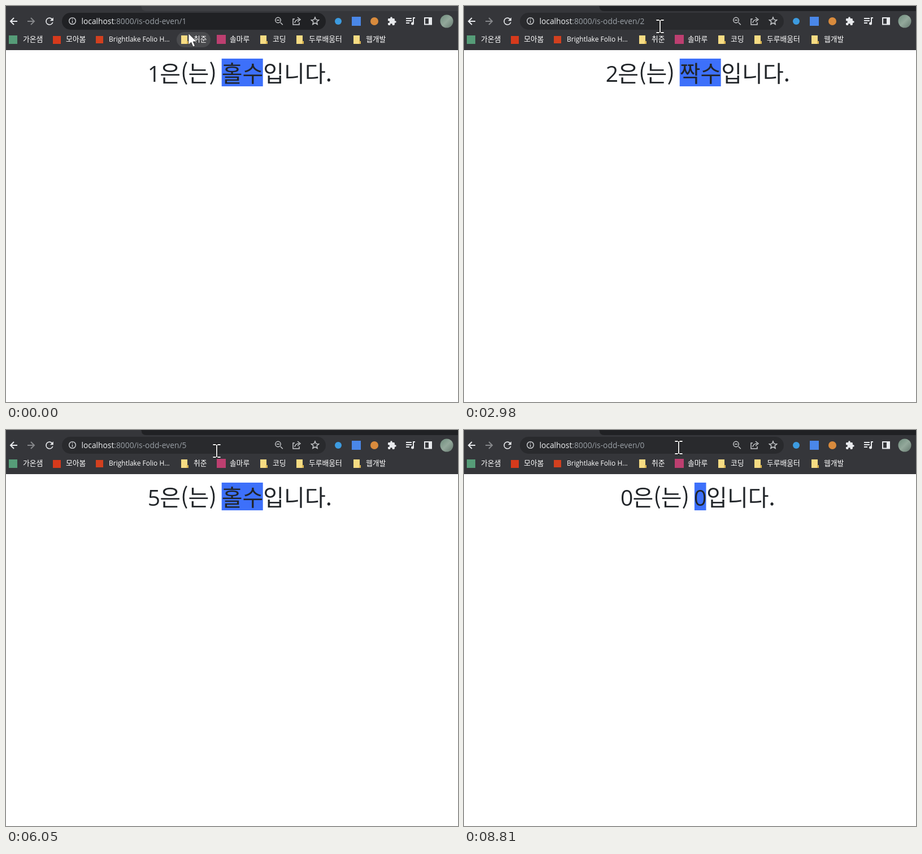
An HTML page for the animation above (9670 ms loop, 800 px wide and 700 px high).

```html
<!DOCTYPE html>
<html lang="ko">
<head>
<meta charset="utf-8">
<style>
  html, body { margin: 0; width: 100%; height: 100%; overflow: hidden; background: #fff; }
  svg { display: block; width: 800px; height: 700px; }
  text { font-family: "Open Sans", "Noto Sans CJK KR", "Noto Sans CJK", sans-serif; font-size: 13.8px; }
  .mark { font-size: 12px; fill: #fff; }
  .ko { font-family: "Noto Sans CJK KR", "Noto Sans CJK", sans-serif; font-size: 12.8px; }
  .page text { font-family: "Noto Sans CJK KR", "Noto Sans CJK", sans-serif; font-size: 40px; fill: #212529; }
  .page .digit { font-family: "Open Sans", "Noto Sans", sans-serif; font-size: 39px; text-anchor: middle; }
  .line { fill: none; stroke: #e8eaed; stroke-width: 2; }
  .thin { fill: none; stroke: #c6c8cb; stroke-width: 1.5; }
</style>
</head>
<body>
<svg id="stage" viewBox="0 0 800 700"></svg>
<script>
const LOOP = 9670;
const STEP = 70;
const HOST = 'localhost';
const PATH = ':8000/is-odd-even/';
const BASE = HOST + PATH;
const WHITE = '#f1f3f4', GREY = '#9aa0a6', BLUE = '#7baaf7', DARK = '#202124';

const SHAPES = {
  reload: 'M17.65 6.35A7.96 7.96 0 0 0 12 4a8 8 0 1 0 7.73 10h-2.08A6 6 0 1 1 12 6c1.66 0 3.14.69 4.22 1.78L13 11h7V4z',
  globe: 'M12 2a10 10 0 1 0 0 20 10 10 0 0 0 0-20zm-1 17.93A8 8 0 0 1 4 12c0-.62.08-1.21.21-1.79L9 15v1a2 2 0 0 0 2 2zm6.9-2.54A2 2 0 0 0 16 16h-1v-3a1 1 0 0 0-1-1H8v-2h2a1 1 0 0 0 1-1V7h2a2 2 0 0 0 2-2v-.41A8 8 0 0 1 17.9 17.39z',
  puzzle: 'M20.5 11H19V7c0-1.1-.9-2-2-2h-4V3.5a2.5 2.5 0 0 0-5 0V5H4a2 2 0 0 0-2 2v3.8h1.5a2.7 2.7 0 0 1 0 5.4H2V20a2 2 0 0 0 2 2h3.8v-1.5a2.7 2.7 0 0 1 5.4 0V22H17a2 2 0 0 0 2-2v-4h1.5a2.5 2.5 0 0 0 0-5z'
};

// One entry per address typed into the bar; times in ms.
const rounds = [
  { focus: 740, caret: 1400, erase: 1600, open: 1730, typed: 1870, enter: 2270, page: 2500, done: 2670,
    digit: '2', history: ['1', '0', '3', '2'], matches: ['2', null, '24'] },
  { focus: 3380, caret: 3980, erase: 4640, open: 4710, typed: 4850, enter: 5250, page: 5450, done: 5590,
    digit: '5', history: ['2', '1', '0', '3'], matches: ['', null] },
  { focus: 6470, caret: 7070, erase: 7270, open: 7340, typed: 7730, enter: 8530, page: 8670, done: 8810,
    digit: '0', history: ['5', '2', '1', '0', '3'], matches: ['0', null] }
];

// Pointer moves: start, end, from x, y, to x, y.
const moves = [
  [130, 700, 324, 50, 345, 29],
  [2980, 2980, 345, 29, 347, 36],
  [3310, 3310, 347, 36, 347, 40],
  [3380, 3380, 347, 40, 347, 36],
  [6050, 6470, 373, 37, 380, 31]
];

const icon = (name, x, y, scale, fill = '#e8eaed') =>
  `<path d="${SHAPES[name]}" fill="${fill}" transform="translate(${x} ${y}) scale(${scale}) translate(-12 -12)"/>`;
const cross = (x, y, r) => `<path class="line" style="stroke-width:1.6" d="M${x - r} ${y - r}l${2 * r} ${2 * r}m0 ${-2 * r}l${-2 * r} ${2 * r}"/>`;
const lens = (x, y, r) => `<g class="thin"><circle cx="${x - 1}" cy="${y - 1}" r="${r}"/><path d="M${x + r * .7} ${y + r * .7}l4 4"/></g>`;
const block = (x, y, size, fill) => `<rect x="${x}" y="${y}" width="${size}" height="${size}" fill="${fill}"/>`;
const dot = (x, y, r, fill) => `<circle cx="${x}" cy="${y}" r="${r}" fill="${fill}"/>`;
const span = (text, fill, extra = '') => `<tspan fill="${fill}" ${extra}>${text}</tspan>`;
const dash = span('-', GREY, 'dx="5.5"');
const label = (x, text, cls = 'ko') => `<text class="mark ${cls}" x="${x}" y="63.2">${text}</text>`;
const folder = (x, text) =>
  `<path d="M${x} 52h11v10h2v5h-13z" fill="#f7dc83"/><path d="M${x + 10} 62h3v5h-3z" fill="#d9b452"/>` + label(x + 22, text);

const toolbar = `
  <rect width="800" height="78" fill="#35363a"/>
  <path id="strip" d="M239 0H800V9H248Q240 9 240 2z"/>
  <path class="line" d="M20 27H8m6-6l-6 6l6 6"/>
  <path class="line" style="stroke:#85878a" d="M38 27H50m-6-6l6 6l-6 6"/>
  <g id="reload">${icon('reload', 77, 27, .85)}</g>
  <g id="stop">${cross(77, 27, 5)}</g>
  ${dot(588, 27, 6, '#3d9be0')}${block(612, 19, 16, '#4a87e8')}${dot(652, 27, 7, '#d98b3d')}
  ${icon('puzzle', 683, 27, .7)}
  <path class="line" d="M708 22h10m-10 4h10m-10 4h6m7 1v-10h3"/>${dot(719.5, 31, 2.5, '#e8eaed')}
  <path class="line" d="M741 21h12v11.500h-12z"/><path d="M748 21h5v11h-5z" fill="#e8eaed"/>
  ${dot(780, 27, 11.5, 'url(#avatar)')}
  <rect id="hover" x="302" y="46" width="60" height="27" rx="13.500" fill="#494a4d"/>
  ${block(5, 52, 15, '#569d78')}${label(30, '가온샘')}
  ${block(83, 53, 14, '#d63a1c')}${label(106, '모아봄')}
  ${block(159, 53, 13, '#d2401f')}${label(182, 'Brightlake Folio H...', '')}
  ${folder(310, '취준')}
  ${block(373, 51, 16, '#bd3f70')}${label(396, '솔마루')}
  ${folder(450, '코딩')}${folder(514, '두루배움터')}${folder(615, '웹개발')}`;

const stage = document.getElementById('stage');
stage.innerHTML = `
  <defs>
    <linearGradient id="avatar" x2="1" y2="1">
      <stop stop-color="#6f8c7c"/><stop offset=".5" stop-color="#93a89b"/><stop offset="1" stop-color="#66796f"/>
    </linearGradient>
    <filter id="shadow" x="-10%" y="-15%" width="120%" height="140%">
      <feDropShadow dx="0" dy="3" stdDeviation="4.500" flood-opacity=".42"/>
    </filter>
  </defs>
  <rect width="800" height="700" fill="#fff"/>
  <rect id="glow" y="93" height="49" fill="#3d70fa"/>
  <g class="page">
    <text id="number" class="digit" y="134"></text>
    <text id="topic" y="134">은(는)</text>
    <text id="word" y="134"></text>
    <text id="ending" y="134">입니다.</text>
  </g>
  ${toolbar}
  <rect id="pill" x="99" y="12" width="467" height="30" rx="15"/>
  <g id="popup"></g>
  <g id="info"><circle class="thin" cx="117.500" cy="26.500" r="5.800"/><path class="thin" d="M117.500 25.500v4.500m0-7.500v1.500"/></g>
  <g id="globe">${icon('globe', 117, 26.5, .7, '#bdc1c6')}</g>
  <g id="actions">
    ${lens(482.5, 26, 4.7)}<path class="thin" d="M479 25h5"/>
    <path class="thin" d="M511 23h-3v10h11v-4M511 30q1-6 8-6m-3-4l5 4l-5 4"/>
    <path class="thin" d="M547 20l1.900 4.400l4.700.4l-3.600 3.100l1.100 4.600l-4.100-2.500l-4.100 2.500l1.100-4.600l-3.600-3.100l4.700-.4z"/>
  </g>
  <rect id="selection" x="134" y="16" width="186" height="21" fill="#185abc"/>
  <text id="address" y="31.500"></text>
  <rect id="caret" y="16" width="1.200" height="18" fill="#e8eaed"/>
  <path id="arrow" d="M0 0V20L4.700 15.700L8 23.500L11.500 22L8.200 14.500H14.500z" fill="#fff" stroke="#222" stroke-width=".8"/>
  <g id="beam" fill="none">
    <path d="M-6-11H6M-6 11H6M0-11V11" stroke="#111" stroke-width="3.600"/>
    <path d="M-6.500-11H-1.500M1.500-11H6.500M-6.500 11H-1.500M1.500 11H6.500M0-11V11" stroke="#fff" stroke-width="1.800"/>
  </g>`;

const el = {};
stage.querySelectorAll('[id]').forEach(node => el[node.id] = node);
const set = (node, attrs) => Object.entries(attrs).forEach(([key, value]) => node.setAttribute(key, value));
const show = (node, on) => node.style.display = on ? '' : 'none';
const fill = (node, html) => {
  if (node.markup !== html) node.innerHTML = node.markup = html;
};

// A null match is the web search row, an empty one the bare address.
function row(index, match, typed) {
  const y = 64 + index * 38;
  const text = content => `<text x="144" y="${y + 5}">${content}</text>`;
  if (match === null) {
    return lens(116, y - 1, 4.2) + text(span(BASE + typed, WHITE) + dash + span('Wemblo 검색', GREY, 'dx="6"'));
  }
  const address = BASE + (match.startsWith(typed) ? typed : '');
  const rest = match.slice(typed.length);
  let content = span('Document', WHITE) + dash + span(address, BLUE, 'dx="6" font-weight="600"') + span(rest, BLUE);
  if (match === '') {
    content = typed
      ? span(BASE + typed, BLUE, 'font-weight="600"')
      : span('Page not found at /', WHITE) + span('is-odd-even/', WHITE, 'font-weight="600"') + dash + span(BASE, BLUE, 'dx="6"');
  }
  return icon('globe', 117, y, .7, '#bdc1c6') + text(content);
}

function popupMarkup(matches, typed) {
  const height = matches.length * 38 + 43.5;
  return `<rect x="93" y="9.500" width="478" height="${height}" rx="7" fill="${DARK}" filter="url(#shadow)"/>
    <rect x="93" y="45" width="478" height="38" fill="#3a3b3f"/>
    <rect x="93" y="45" width="3" height="38" fill="#8ab4f8"/>
    ${cross(550, 64, 4)}${matches.map((match, i) => row(i, match, typed)).join('')}`;
}

function pointerAt(t) {
  let x = 324, y = 50;
  for (const [start, end, x0, y0, x1, y1] of moves) {
    if (t < start) break;
    const part = end > start ? Math.min(1, Math.floor((t - start) / STEP) * STEP / (end - start)) : 1;
    x = x0 + (x1 - x0) * part;
    y = y0 + (y1 - y0) * part;
  }
  return { x, y };
}

function drawPage(digit) {
  const zero = digit === '0';
  const shift = zero ? 26.2 : 0;
  const wordWidth = zero ? 20.6 : 73;
  const wordX = 381.7 + shift;
  el.number.textContent = digit;
  set(el.number, { x: 262 + shift });
  set(el.topic, { x: 272.3 + shift });
  set(el.glow, { x: wordX, width: wordWidth });
  el.word.textContent = zero ? '0' : digit % 2 ? '홀수' : '짝수';
  el.word.setAttribute('class', zero ? 'digit' : '');
  set(el.word, { x: zero ? wordX + wordWidth / 2 : wordX });
  set(el.ending, { x: wordX + wordWidth + .6 });
}

function drawBar(t, digit, pointer) {
  const round = rounds.find(r => t >= r.focus && t < r.enter);
  const editing = !!round && t >= round.erase;
  const typed = editing && t >= round.typed;
  const selected = !!round && t < round.caret;
  const loading = rounds.some(r => t >= r.enter && t < r.done);
  const sent = rounds.filter(r => t >= r.enter).pop();
  const tail = editing ? (typed ? round.digit : '') : sent ? sent.digit : digit;
  const left = editing ? 144.5 : 133.5;
  const hovered = !round && pointer.y < 44;

  set(el.pill, { fill: hovered ? '#292a2d' : DARK });
  show(el.info, !editing);
  show(el.globe, editing);
  show(el.actions, !round);
  show(el.reload, !loading);
  show(el.stop, loading);
  show(el.selection, selected);
  fill(el.address, span(HOST, WHITE) + span(PATH + tail, selected ? WHITE : GREY));
  set(el.address, { x: left });

  let caretOn = false;
  if (round && !selected) {
    const since = typed ? round.typed : editing ? round.erase : round.caret;
    const beat = Math.floor((t - since) / 200);
    caretOn = typed ? beat % 2 === 0 : editing || beat !== 1;
  }
  show(el.caret, caretOn);
  set(el.caret, { x: !editing ? 320 : typed ? 330.8 : 323.5 });

  const open = editing && t >= round.open;
  show(el.popup, open);
  if (open) {
    const matches = typed ? round.matches : ['', null, ...round.history];
    const step = Math.floor((t - round.open) / STEP);
    fill(el.popup, popupMarkup(matches, typed ? round.digit : ''));
    set(el.popup, { opacity: typed ? 1 : [.14, .7][step] ?? 1 });
  }
}

function draw(t) {
  const shown = rounds.filter(r => t >= r.page).pop();
  const digit = shown ? shown.digit : '1';
  const pointer = pointerAt(t);
  const overBar = pointer.y < 44;
  drawPage(digit);
  drawBar(t, digit, pointer);
  set(el.strip, { fill: t < 670 ? '#3e3f43' : DARK });
  show(el.hover, pointer.y > 46);
  show(el.arrow, !overBar);
  show(el.beam, overBar);
  set(overBar ? el.beam : el.arrow, {
    transform: `translate(${pointer.x - (overBar ? 0 : 1)} ${pointer.y - (overBar ? 0 : 1.5)})`
  });
}

const start = performance.now();
function tick() {
  draw((performance.now() - start) % LOOP);
  requestAnimationFrame(tick);
}
tick();
</script>
</body>
</html>
```
